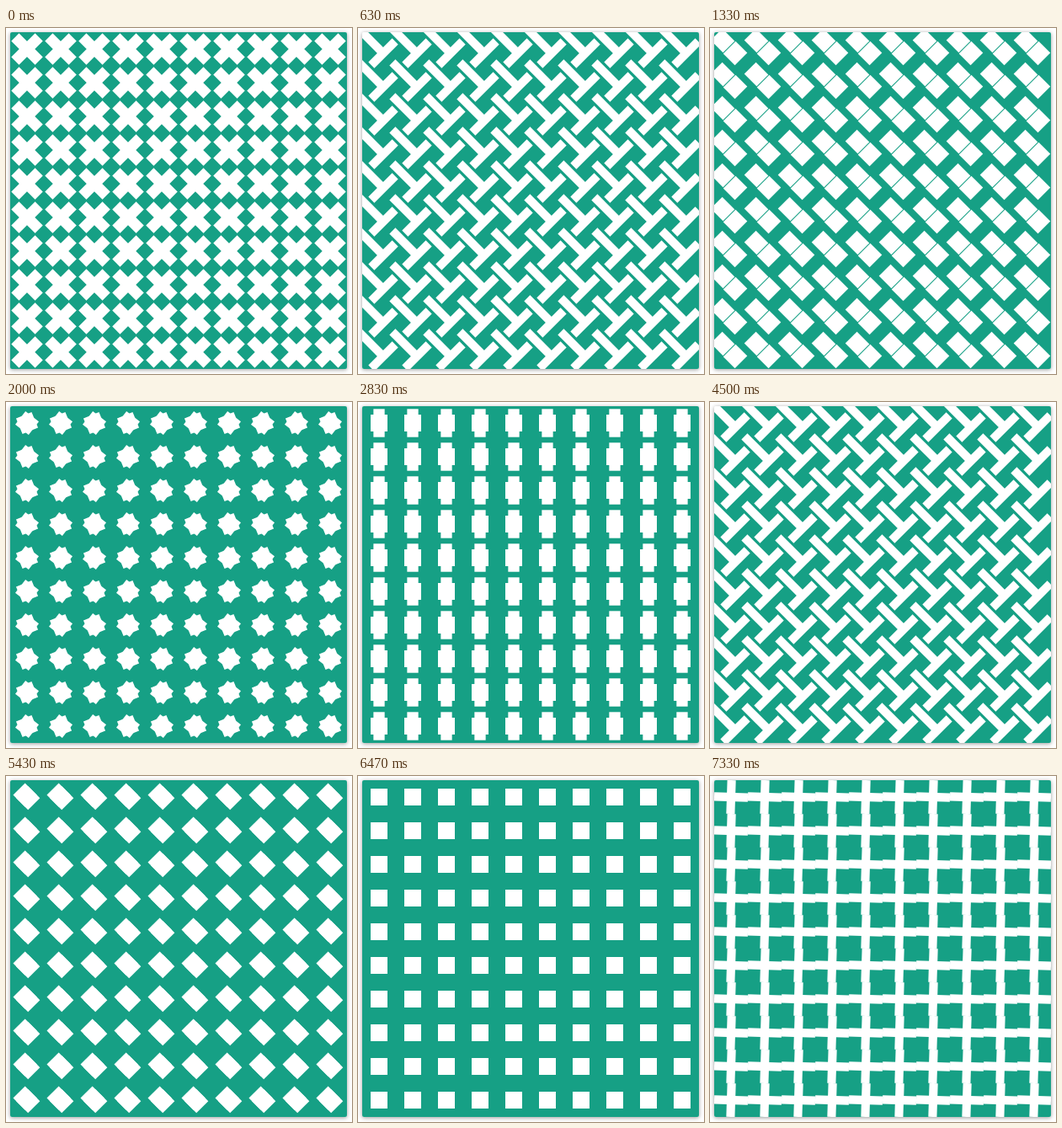
Animation of 411 by 411 pixels, one loop 7.36 s. Source, as an HTML page with a canvas:

```html
<!DOCTYPE html>
<html lang="en">
<head>
<meta charset="utf-8">
<title>Woven crosses</title>
<style>
  html, body {
    margin: 0;
    width: 100%;
    height: 100%;
    overflow: hidden;
    background: #fff;
  }
  canvas {
    position: absolute;
    left: 5px;
    top: 5px;
    width: 400px;
    height: 400px;
    border-radius: 2px;
    box-shadow: 0 1px 5px rgba(0, 0, 0, .4);
  }
</style>
</head>
<body>
<canvas id="board"></canvas>
<script>
  const LOOP = 7360, CYCLE = 3850, SIZE = 400, CELL = 40;

  // Bursts of movement as [start, end, steps]; the pattern rests in between.
  const BURSTS = [
    [30, 730, 20], [770, 830, 3], [1330, 2000, 10], [2170, 2830, 10],
    [3030, 3670, 8], [3770, 3830, 2], [3970, 4630, 10], [4770, 5430, 9],
    [5530, 5530, 1], [5770, 6470, 8], [6530, 6630, 2], [6830, 7330, 7]
  ];

  const board = document.getElementById('board');
  const ctx = board.getContext('2d');
  const ratio = window.devicePixelRatio || 1;
  board.width = board.height = SIZE * ratio;

  const mix = (a, b, p) => a + (b - a) * p;
  const ease = p => p < .5 ? 2 * p * p : 1 - 2 * (1 - p) ** 2;
  const span = (t, from, to) =>
    ease(Math.min(1, Math.max(0, (t - from) / (to - from))));

  function stepTime(t) {
    let last = 0;
    for (const [start, end, steps] of BURSTS) {
      if (t < start) break;
      const gap = (end - start) / Math.max(1, steps - 1);
      last = gap ? start + Math.floor((Math.min(t, end) - start) / gap + 1e-6) * gap : start;
    }
    return last;
  }

  function pose(t) {
    const slide = span(t, 0, 640) - span(t, 1390, 1680);
    const shrink = span(t, 920, 1400);
    const spin = span(t, 1740, 2640);
    const turn = span(t, 3428, 3790);
    const thick = 3 * (turn + 1 - span(t, 0, 400)) * (t < 400 || turn > 0 ? 1 : 0);

    const bar = (offset, angle, stretch) => {
      const slim = 1 - shrink + stretch;
      return {
        offset: offset * slide,
        angle: (angle + 45 * turn) * Math.PI / 180,
        length: mix(20, 40, slim),
        width: mix(20, 10, slim) + thick
      };
    };
    return [
      bar(-10, 45 + 135 * spin, span(t, 2850, 3380)),
      bar(5, 135 - 45 * spin, span(t, 2640, 2960))
    ];
  }

  function draw(time) {
    const bars = pose(stepTime(time % LOOP) % CYCLE);
    ctx.setTransform(ratio, 0, 0, ratio, 0, 0);
    ctx.fillStyle = '#16a085';
    ctx.fillRect(0, 0, SIZE, SIZE);
    ctx.fillStyle = '#fff';
    for (let y = CELL / 2; y < SIZE; y += CELL) {
      for (let x = CELL / 2; x < SIZE; x += CELL) {
        for (const { offset, angle, length, width } of bars) {
          ctx.save();
          ctx.translate(x + offset, y + offset);
          ctx.rotate(angle);
          ctx.fillRect(-length / 2, -width / 2, length, width);
          ctx.restore();
        }
      }
    }
  }

  const begin = performance.now();
  function tick() {
    draw(performance.now() - begin);
    requestAnimationFrame(tick);
  }
  tick();
</script>
</body>
</html>
```
